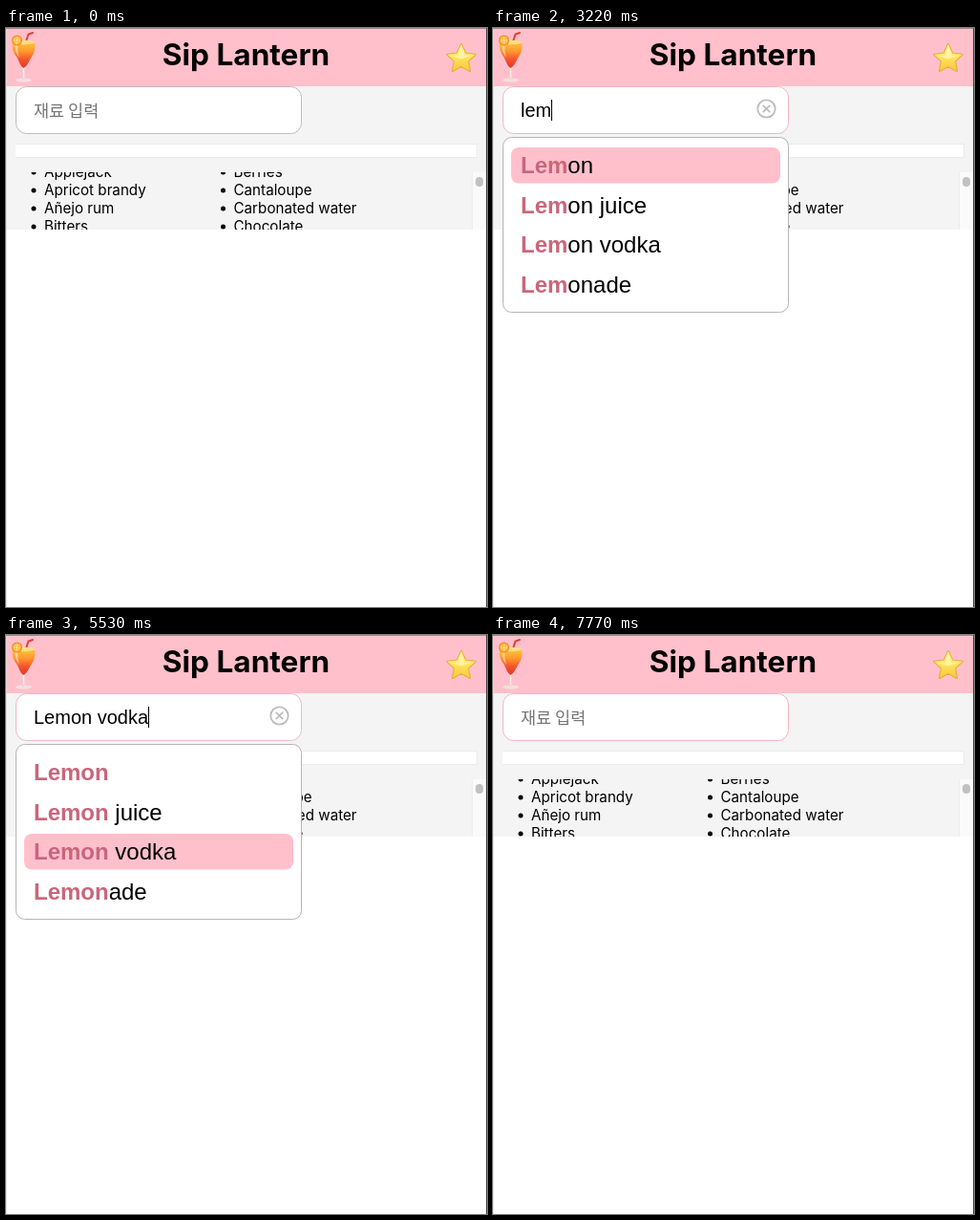
An HTML page with a canvas that plays this animation: 504x606 px, repeating every 8000 ms.

```html
<!DOCTYPE html>
<html lang="ko">
<head>
<meta charset="utf-8">
<title>Ingredient search</title>
<style>
  html, body { margin: 0; width: 100%; height: 100%; overflow: hidden; background: #fff; }
  canvas { display: block; }
</style>
</head>
<body>
<canvas id="stage" width="504" height="606"></canvas>
<script>
const ctx = document.getElementById('stage').getContext('2d');
const LOOP = 8000;
const PINK = '#ffc0cb';
const UI = 'Inter, sans-serif';
const FIELD = '"Liberation Sans", Arial, sans-serif';
const KOREAN = '"Noto Sans CJK KR", "Noto Sans CJK", sans-serif';

const INGREDIENTS = ['Lager', 'Lemon', 'Lemon juice', 'Lemon vodka', 'Lemonade',
  'Light cream', 'Light rum', 'Lime', 'Lime juice', 'Lime vodka'];
const COLUMNS = [
  [40, ['Applejack', 'Apricot brandy', 'Añejo rum', 'Bitters']],
  [238.5, ['Berries', 'Cantaloupe', 'Carbonated water', 'Chocolate']]
];

// time, field text, matched prefix length (0 = list closed), selected row
const STEPS = [
  [0, '', 0, 0],
  [2240, 'l', 0, 0],
  [2590, 'l', 1, 0],
  [3150, 'le', 2, 0],
  [3220, 'lem', 3, 0],
  [3360, 'lemo', 4, 0],
  [3500, 'lemon', 5, 0],
  [4550, 'Lemon juice', 5, 1],
  [5530, 'Lemon vodka', 5, 2],
  [5950, 'Lemonade', 5, 3],
  [6510, 'Lemonad', 5, 3],
  [6580, 'Lemona', 6, 0],
  [6720, 'Lemon', 5, 0],
  [6930, 'Lemo', 4, 0],
  [7070, 'Lem', 3, 0],
  [7350, 'Le', 2, 0],
  [7490, 'L', 1, 0],
  [7700, '', 0, 0]
];
const CARET_ON = [[1260, 1820], [2240, 2730], [3150, 3990], [4550, 5110], [5530, 6370], [7140, 7700]];
const FOCUS = 1190;

function rect(x, y, w, h, fill) {
  ctx.fillStyle = fill;
  ctx.fillRect(x, y, w, h);
}

function roundBox(x, y, w, h, r, fill, stroke) {
  ctx.beginPath();
  ctx.roundRect(x, y, w, h, r);
  ctx.fillStyle = fill;
  ctx.fill();
  if (stroke) {
    ctx.lineWidth = 1;
    ctx.strokeStyle = stroke;
    ctx.stroke();
  }
}

function text(str, x, y, font, fill = '#000') {
  ctx.font = font;
  ctx.fillStyle = fill;
  ctx.fillText(str, x, y);
  return ctx.measureText(str).width;
}

function shape(d, fill) {
  ctx.fillStyle = fill;
  ctx.fill(new Path2D(d));
}

function line(d, stroke, width) {
  ctx.strokeStyle = stroke;
  ctx.lineWidth = width;
  ctx.stroke(new Path2D(d));
}

function gradient(y0, y1, ...colors) {
  const g = ctx.createLinearGradient(0, y0, 0, y1);
  colors.forEach((c, i) => g.addColorStop(i / (colors.length - 1), c));
  return g;
}

function drawDrink() {
  ctx.lineCap = 'round';
  shape('M10 54.5a8.5 2 0 1 0 17 0a8.5 2 0 1 0 -17 0Z', '#f4dfe0');
  line('M18.3 41V53', '#efd5d3', 2.4);
  line('M18.6 42V52', '#fff4f0', 0.8);
  line('M19 20L23.5 6.5L28 5', '#e0403a', 2);
  shape('M7 15C6 22 8 26 11 30C14 35 15 40 18.5 42C22 40 24 35 27 30C30 26 31 21 30 15Z',
    gradient(15, 42, '#ffc53d', '#ff9a2e', '#f4542c', '#d93a2c'));
  shape('M9.5 18C9.5 24 11 27 14 31C12.6 26 12 22 12.5 18Z', 'rgba(255,255,255,.45)');
  shape('M7 15a11.5 2.2 0 1 0 23 0a11.5 2.2 0 1 0 -23 0Z', '#ffdd84');
  shape('M6 13a5.5 5.5 0 1 0 11 0a5.5 5.5 0 1 0 -11 0Z', '#f58a1f');
  shape('M7.3 13a4.2 4.2 0 1 0 8.4 0a4.2 4.2 0 1 0 -8.4 0Z', '#ffc04a');
  line('M11.5 9.5V16.5M8.2 13H14.8', '#fbe0a0', 0.7);
  ctx.lineCap = 'butt';
}

function drawStar() {
  ctx.beginPath();
  for (let i = 0; i < 10; i++) {
    const a = -Math.PI / 2 + i * Math.PI / 5;
    const r = i % 2 ? 7.4 : 15.5;
    ctx.lineTo(477 + r * Math.cos(a), 32.5 + r * Math.sin(a));
  }
  ctx.closePath();
  ctx.lineJoin = 'round';
  ctx.lineWidth = 2;
  ctx.strokeStyle = '#e5ad38';
  ctx.stroke();
  ctx.fillStyle = gradient(17, 46, '#fff6a8', '#ffe15a', '#f7c53b');
  ctx.fill();
  shape('M477 20L480 28.5L488 29L477 32.5L466 29L474 28.5Z', 'rgba(255,255,220,.5)');
  ctx.lineJoin = 'miter';
}

function drawPage() {
  rect(0, 0, 504, 606, '#fff');
  rect(0, 61, 503, 150, '#f4f4f4');
  rect(0, 0, 503, 61, PINK);
  ctx.textAlign = 'center';
  text('Sip Lantern', 251.5, 38.5, '700 31.6px ' + UI);
  ctx.textAlign = 'left';
  drawDrink();
  drawStar();

  rect(10, 121, 484, 15, '#ebebeb');
  rect(10, 122, 483, 13, '#fff');

  ctx.save();
  ctx.beginPath();
  ctx.rect(10, 151, 479, 60);
  ctx.clip();
  for (const [x, names] of COLUMNS) {
    names.forEach((name, i) => {
      const y = 156 + i * 19;
      text(name, x, y - 0.5, '15.2px ' + UI);
      ctx.beginPath();
      ctx.arc(x - 11, y - 5, 2.5, 0, 7);
      ctx.fill();
    });
  }
  ctx.restore();

  rect(488, 151, 15, 60, '#ececec');
  rect(489, 151, 14, 60, '#fafafa');
  roundBox(492, 156, 8, 10, 4, '#c1c1c1');
}

function drawField(t, value) {
  roundBox(10.5, 61.5, 299, 49, 11, '#fff', t < FOCUS ? '#bdbdbd' : '#f3b6c3');
  let end = 29;
  if (value) {
    end += text(value, 29, 93, '20px ' + FIELD);
    ctx.beginPath();
    ctx.arc(286.5, 84.5, 9.2, 0, 7);
    ctx.strokeStyle = '#bdbdbd';
    ctx.lineWidth = 1.8;
    ctx.stroke();
    line('M282.8 80.8L290.2 88.2M290.2 80.8L282.8 88.2', '#bdbdbd', 1.8);
  } else {
    text('재료 입력', 29, 92.5, '17.5px ' + KOREAN, '#757575');
  }
  if (CARET_ON.some(([a, b]) => t >= a && t < b)) rect(Math.floor(end), 75, 1, 22, '#000');
}

function drawList(value, length, selected) {
  if (!length) return;
  const prefix = value.slice(0, length).toLowerCase();
  const rows = INGREDIENTS.filter(name => name.toLowerCase().startsWith(prefix));
  roundBox(10.5, 114.5, 299, rows.length * 41.5 + 17, 9, '#fff', '#b5b5b5');
  rows.forEach((name, i) => {
    const y = 125 + i * 41.5;
    if (i === selected) roundBox(19, y, 282, 37.5, 8, PINK);
    const w = text(name.slice(0, length), 29, y + 27, 'bold 24px ' + FIELD, '#c9667b');
    text(name.slice(length), 29 + w, y + 27, '24px ' + FIELD);
  });
}

function drawPointer(t) {
  if (t < 490 || t >= 2240) return;
  const p = Math.min(1, (t - 490) / 770);
  const ease = p * p * (3 - 2 * p);
  const x = 205 - 49 * ease;
  const y = 514 - 427 * ease;
  ctx.save();
  ctx.translate(Math.round(x), Math.round(y));
  if (y < 110) {
    line('M-3 -8.5Q0 -8.5 0.5 -7Q1 -8.5 4 -8.5M0.5 -7V7M-3 8.5Q0 8.5 0.5 7Q1 8.5 4 8.5', '#222', 1);
  } else {
    const arrow = 'M0 0V15L3.6 11.8L6 17L8.4 16L6.1 10.9H11Z';
    line(arrow, '#fff', 2);
    shape(arrow, '#000');
  }
  ctx.restore();
}

function drawEdges() {
  rect(0, 0, 504, 1, '#a08c90');
  rect(0, 1, 1, 605, 'rgba(225,225,225,.7)');
  rect(503, 0, 1, 606, '#4a4a4a');
}

function frame() {
  const t = performance.now() % LOOP;
  const [, value, length, selected] = STEPS.findLast(step => step[0] <= t);
  drawPage();
  drawField(t, value);
  drawList(value, length, selected);
  drawPointer(t);
  drawEdges();
  requestAnimationFrame(frame);
}
frame();
</script>
</body>
</html>
```
